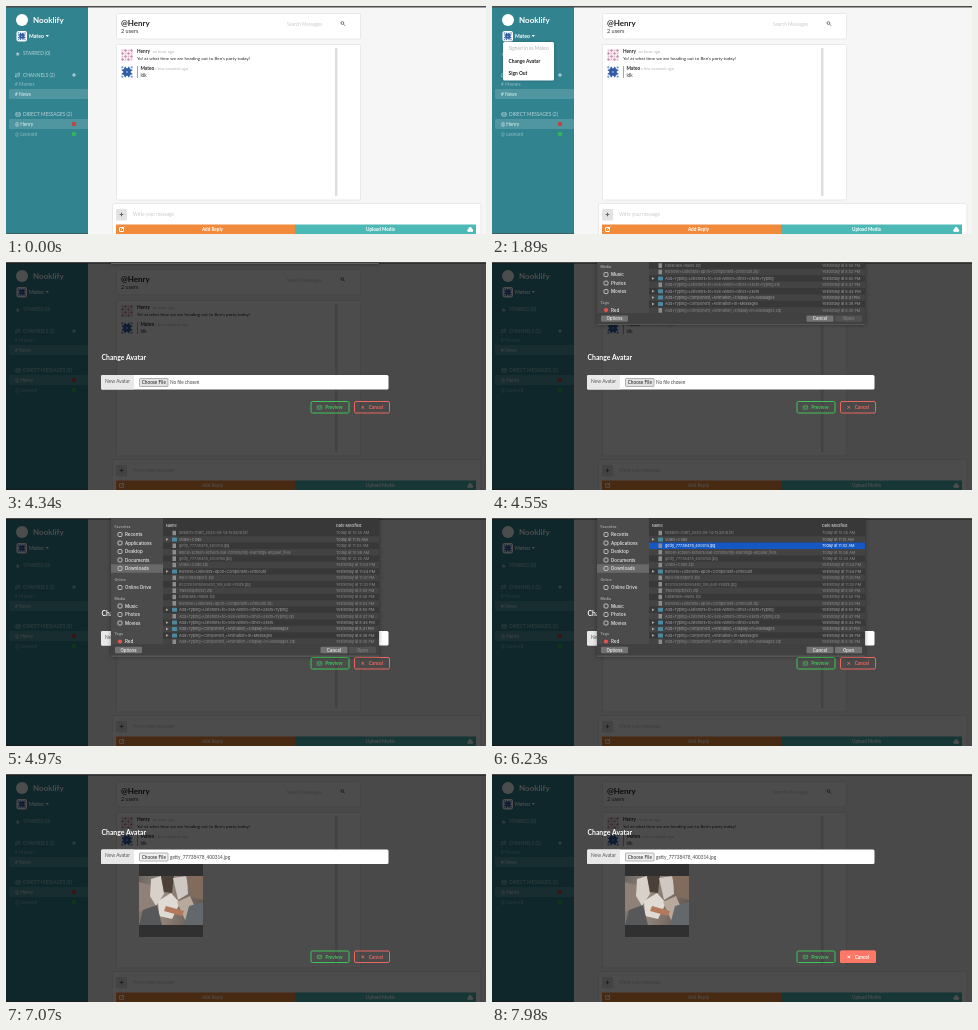
An HTML page with a canvas for the animation above (8000 ms loop, 480x228 px).

```html
<!DOCTYPE html>
<html lang="en">
<head>
<meta charset="utf-8">
<title>Change avatar</title>
<style>
html, body { margin: 0; width: 100%; height: 100%; overflow: hidden; background: #f6f6f6; }
canvas { display: block; width: 480px; height: 228px; }
</style>
</head>
<body>
<canvas id="stage" width="480" height="228"></canvas>
<script>
const ctx = document.getElementById('stage').getContext('2d');
const LOOP = 8000, TICK = 70;
const UI = 'Lato, sans-serif', SYSTEM = 'Inter, sans-serif';
const APP = 'Nooklify', FRIEND = 'Henry', ME = 'Mateo', OTHER = 'Leonard';
const FILE = 'getty_77738478_400314.jpg';

const clamp = v => Math.max(0, Math.min(1, v));
const ease = v => (1 - Math.cos(Math.PI * clamp(v))) / 2;

function box(x, y, w, h, fill, radius = 0, stroke) {
  ctx.beginPath();
  ctx.roundRect(x, y, w, h, radius);
  if (fill) { ctx.fillStyle = fill; ctx.fill(); }
  if (stroke) { ctx.strokeStyle = stroke; ctx.stroke(); }
}

function dot(x, y, r, fill) {
  ctx.beginPath();
  ctx.arc(x, y, r, 0, 7);
  ctx.fillStyle = fill;
  ctx.fill();
}

function shape(points, fill) {
  ctx.beginPath();
  points.forEach(([x, y]) => ctx.lineTo(x, y));
  ctx.fillStyle = fill;
  ctx.fill();
}

function line(points, color, width = 0.8) {
  ctx.beginPath();
  points.forEach(([x, y], i) => i ? ctx.lineTo(x, y) : ctx.moveTo(x, y));
  ctx.strokeStyle = color;
  ctx.lineWidth = width;
  ctx.stroke();
  ctx.lineWidth = 1;
}

// y is the middle of the capitals
function text(str, x, y, size, color, weight = 400, align = 'left', family = UI) {
  ctx.font = `${weight} ${size}px ${family}`;
  ctx.textAlign = align;
  ctx.fillStyle = color;
  ctx.fillText(str, x, y + size * 0.36);
}

function plus(x, y, r, color) {
  line([[x - r, y], [x + r, y]], color, 1);
  line([[x, y - r], [x, y + r]], color, 1);
}

function envelope(x, y, color) {
  ctx.lineWidth = 0.7;
  box(x - 2.2, y - 1.7, 4.4, 3.4, null, 0.5, color);
  line([[x - 2.2, y - 1.2], [x, y + 0.5], [x + 2.2, y - 1.2]], color, 0.6);
}

function blueIdenticon(x, y, s) {
  box(x, y, s, s, '#fff');
  ctx.save();
  ctx.translate(x + s / 2, y + s / 2);
  ctx.scale(s / 12, s / 12);
  box(-3.3, -3.3, 6.6, 6.6, '#315ea8');
  for (let i = 0; i < 4; i++) {
    shape([[-3, -3], [-2, -5.8], [0, -3.2], [2, -5.8], [3, -3]], '#315ea8');
    shape([[-5.6, -5.6], [-3.7, -5.6], [-3.7, -3.7], [-5.6, -3.7]], '#6f91c8');
    ctx.rotate(Math.PI / 2);
  }
  dot(0, 0, 0.8, '#c5d4ee');
  ctx.restore();
}

function pinkIdenticon(x, y) {
  box(x, y, 12, 12, '#faeef3');
  for (let i = 0; i < 16; i++) {
    const cx = x + 1.5 + 3 * (i % 4), cy = y + 1.5 + 3 * (i >> 2);
    const r = (i + (i >> 2)) % 2 ? 1.5 : 1;
    shape([[cx - r, cy], [cx, cy - r], [cx + r, cy], [cx, cy + r]], r > 1 ? '#c98fae' : '#dfb5c9');
  }
}

function sidebar() {
  const head = 'rgba(255,255,255,.66)', item = 'rgba(255,255,255,.45)';
  box(0, 0, 82, 228, '#31838f');
  dot(16, 14, 6, '#fff');
  text(APP, 27, 14.3, 8, '#fff', 700);
  box(10.5, 25, 10.5, 10.5, '#fff', 2);
  blueIdenticon(11.5, 26, 8.5);
  text(ME, 23, 30, 5.1, '#fff', 700);
  shape([[39.5, 29], [43, 29], [41.2, 31]], '#fff');

  text('★', 9, 47.5, 6, head, 400, 'left', 'DejaVu Sans, sans-serif');
  text('STARRED (0)', 17, 47.5, 4.8, head);
  line([[9, 68], [14, 68], [12.5, 66.7]], head, 0.7);
  line([[14, 70], [9, 70], [10.5, 71.3]], head, 0.7);
  text('CHANNELS (2)', 17, 69, 4.8, head);
  plus(68, 69, 2, head);
  text('# Memes', 9, 78, 4.8, item);
  box(3, 83, 79, 10, 'rgba(255,255,255,.15)', 1);
  text('# News', 9, 88, 4.8, '#e8f2f3');

  envelope(12, 108.5, head);
  text('DIRECT MESSAGES (2)', 17, 108.5, 4.8, head);
  box(3, 113, 79, 10, 'rgba(255,255,255,.15)', 1);
  text('@ ' + FRIEND, 9, 118, 4.8, '#e4f0f1');
  dot(68, 118, 2.3, '#c24444');
  text('@ ' + OTHER, 9, 128, 4.8, item);
  dot(68, 128, 2.3, '#31b558');
}

function chat() {
  const edge = '#e9e9e9', ink = '#2b2b2b', pale = '#b5b5b5';
  box(110.5, 7.5, 244, 25.5, '#fff', 1, edge);
  text('@' + FRIEND, 115, 16.8, 8, '#222', 700);
  text('2 users', 115, 25, 5.5, '#333');
  text('Search Messages', 281, 18, 4.7, '#cacaca');
  ctx.beginPath();
  ctx.arc(336.4, 17, 1.4, 0, 7);
  ctx.strokeStyle = '#777';
  ctx.stroke();
  line([[337.5, 18.2], [339, 19.8]], '#777', 1);

  box(110.5, 38.5, 244, 155.5, '#fff', 1, edge);
  box(329, 42, 2.5, 148, '#dedede');
  pinkIdenticon(115, 43);
  text(FRIEND, 131, 45.2, 4.7, ink, 700);
  text('an hour ago', 146.5, 45.2, 4.2, pale);
  text("Yo! at what time we are heading out to Ben's party today!", 131, 52, 4.5, ink);
  blueIdenticon(115, 60, 12);
  box(131, 60, 1, 12, '#c9a544');
  text(ME, 134.5, 62.5, 4.7, ink, 700);
  text('a few seconds ago', 148.5, 62.5, 4.2, pale);
  text('idk', 134.5, 69.2, 4.7, ink);

  box(106.5, 197.5, 368.5, 34, '#fff', 2, edge);
  box(110, 203, 11, 11.5, '#e3e3e3', 1);
  plus(115.5, 208.5, 1.8, '#666');
  text('Write your message', 127, 208.7, 4.7, '#c9c9c9');
  box(110, 218.5, 179, 10, '#f28a3c');
  box(289, 218.5, 181, 10, '#4db9b6');
  text('Add Reply', 206.5, 223.7, 4.65, '#fff', 700, 'center');
  text('Upload Media', 374.5, 223.7, 4.65, '#fff', 700, 'center');
  box(113.5, 221.5, 4, 4, null, 0.5, '#fff');
  line([[115, 224], [118.5, 220.5]], '#fff');
  dot(463, 224.4, 1.7, '#fff');
  dot(465.5, 224.4, 1.7, '#fff');
  dot(464.2, 222.9, 1.8, '#fff');
}

function page() {
  box(0, 0, 480, 228, '#f6f6f6');
  sidebar();
  chat();
  box(0, 0, 480, 1.5, '#4b4b4b');
  box(0, 227, 82, 1, '#3d5f66');
}

function menu() {
  ctx.save();
  ctx.shadowColor = 'rgba(0,0,0,.25)';
  ctx.shadowBlur = 3;
  box(11, 36, 51, 38.5, '#fff', 1.5);
  ctx.restore();
  text('Signed in as ' + ME, 16.5, 42, 4.85, '#b4b4b4');
  text('Change Avatar', 16.5, 55, 4.9, '#222', 700);
  text('Sign Out', 16.5, 67.5, 4.9, '#222', 700);
}

function photo(x, y) {
  box(x, y, 64, 74, '#303030');
  ctx.save();
  ctx.beginPath();
  ctx.rect(x, y + 13, 64, 49);
  ctx.clip();
  ctx.translate(x, y + 13);
  const tone = ctx.createLinearGradient(0, 0, 64, 20);
  tone.addColorStop(0, '#6b6560');
  tone.addColorStop(0.45, '#98897d');
  tone.addColorStop(1, '#655b55');
  box(0, 0, 64, 49, tone);
  shape([[0, 6], [11, 9], [15, 30], [0, 36]], '#8f8178');
  shape([[12, 3], [22, 0], [25, 18], [17, 30], [11, 20]], '#d8d1ca');
  shape([[22, 0], [35, 0], [33, 17], [25, 16]], '#4d4039');
  shape([[34, 2], [48, 0], [49, 18], [39, 24]], '#cfc7c1');
  shape([[47, 0], [64, 0], [64, 24], [52, 21]], '#806b5d');
  shape([[19, 25], [32, 17], [41, 27], [33, 43], [20, 40]], '#e0dad4');
  shape([[38, 26], [51, 20], [58, 36], [47, 46]], '#b9a99d');
  shape([[4, 34], [18, 29], [23, 49], [0, 49]], '#57585a');
  shape([[27, 30], [45, 35], [43, 40], [25, 35]], '#b3795c');
  shape([[50, 30], [64, 26], [64, 49], [45, 49]], '#62686c');
  ctx.restore();
}

function outlineButton(x, y, w, label, color, fill) {
  box(x + 0.5, y + 0.5, w - 1, 11.5, null, 1.5, color);
  if (fill) {
    ctx.save();
    ctx.globalAlpha *= fill;
    box(x, y, w, 12.5, '#ff7766', 1.5);
    ctx.restore();
  }
  text(label, x + w - 7, y + 6.4, 4.8, fill > 0.5 ? '#fff' : color, 700, 'right');
}

function modal(t) {
  const hasPhoto = t >= 7000, hasFile = t >= 6790;
  const top = hasPhoto ? -37.5 : 0;
  const actions = 139 + (hasPhoto ? 37.5 : 0);
  const pressed = t >= 3780 && t < 3920;
  const hovered = t >= 3360 && t < 7000;
  const green = '#3fc457', red = '#e8675f';
  const hover = clamp((t - 7630) / 280);

  text('Change Avatar', 95.5, 96 + top, 6.85, '#fff', 700);
  if (hasPhoto) photo(133, 89);
  box(95, 113 + top, 287.5, 14.5, '#fff', 1.5);
  box(95, 113 + top, 33, 14.5, '#e8e8e8', [1.5, 0, 0, 1.5]);
  text('New Avatar', 99, 119 + top, 4.85, '#555');
  ctx.lineWidth = 0.7;
  box(133.5, 116.5 + top, 28.5, 8, pressed ? '#f5f5f5' : hovered ? '#e3e3e3' : '#efefef', 0.8, '#959595');
  ctx.lineWidth = 1;
  text('Choose File', 147.8, 120.5 + top, 4.7, '#222', 400, 'center');
  text(hasFile ? FILE : 'No file chosen', 164, 120.5 + top, 4.7, '#444');

  outlineButton(304.5, actions, 39, 'Preview', green, 0);
  envelope(313.5, actions + 6.5, green);
  outlineButton(348, actions, 36, 'Cancel', red, hover);
  const cross = hover > 0.5 ? '#fff' : red, cy = actions + 6.4;
  line([[355.5, cy - 1.3], [358, cy + 1.3]], cross, 1);
  line([[358, cy - 1.3], [355.5, cy + 1.3]], cross, 1);
}

const places = [
  ['Favorites', 9], ['Recents', 16.5, 1], ['Applications', 25, 1], ['Desktop', 33.5, 1],
  ['Documents', 42, 1], ['Downloads', 50.5, 1], ['Online', 62], ['Online Drive', 69.5, 1],
  ['Media', 80.5], ['Music', 88, 1], ['Photos', 96.5, 1], ['Movies', 105, 1],
  ['Tags', 116], ['Red', 123.5, 1]
];

const files = [
  'session-chart_2020-09-14-153208.txt', 'Video+Code', FILE,
  'whole-screen-servers-bar-community-learnings-angular_files', 'getty_77738478_4003150.jpg',
  'Video+Code.zip', 'Remove+Listeners+upon+Component+Unmount', 'w60-hd(export).zip',
  '8321203918290482_108_640-resize.jpg', 'TweenSplit(v2).zip', 'Database+Rules.zip',
  'Remove+Listeners+upon+Component+Unmount.zip', 'Add+Typing+Listeners+to+See+When+Other+Users+Typing',
  'Add+Typing+Listeners+to+See+When+Other+Users+Typing.zip', 'Add+Typing+Listeners+to+See+When+Other+Users',
  'Add+Typing+Component,+Animation,+Display+in+Messages', 'Add+Typing+Component,+Animation+in+Messages',
  'Add+Typing+Component,+Animation,+Display+in+Messages.zip'
];
const folders = [1, 6, 12, 14, 15, 16];
const times = ['10:25 AM', '11:15 AM', '11:02 AM', '10:58 AM', '12:20 AM', '11:54 PM', '11:54 PM', '11:41 PM', '11:32 PM'];

function fileRows(t) {
  text('Name', 160, 7.3, 3.8, '#d0d0d0', 500, 'left', SYSTEM);
  text('Date Modified', 330, 7.3, 3.8, '#d0d0d0', 500, 'left', SYSTEM);
  files.forEach((name, i) => {
    const y = 15 + i * 6.4, folder = folders.includes(i);
    const chosen = i === 2 && t >= 5110;
    if (chosen || i % 2) box(157, y - 3.2, 216, 6.4, chosen ? '#1558c4' : '#434343');
    const ink = chosen ? '#fff' : folder ? '#a0a0a0' : '#8a8a8a';
    if (folder) {
      shape([[160, y - 1.4], [162.5, y], [160, y + 1.4]], '#aaa');
      box(166, y - 2, 5, 4, '#4d87a0', 0.5);
    } else {
      box(166.5, y - 2.3, 3.5, 4.6, '#8d8d8d');
    }
    text(name, 173, y, 3.8, ink, 400, 'left', SYSTEM);
    const when = i < 5 ? 'Today at ' + times[i] : 'Yesterday at ' + (times[i] || `8:${59 - 3 * (i - 9)} PM`);
    text(when, 330, y, 3.8, ink, 400, 'left', SYSTEM);
  });
}

function placesList() {
  box(105, 46.3, 52, 8.4, '#69696a');
  places.forEach(([name, y, entry]) => {
    if (!entry) return text(name, 108.5, y, 3.6, '#a5a5a5', 600, 'left', SYSTEM);
    if (name === 'Red') dot(114, y, 2.1, '#e4544f');
    else box(112, y - 2, 4, 4, null, 1, '#bdbdbd');
    text(name, 119, y, 4.5, '#ececec', 500, 'left', SYSTEM);
  });
}

function pushButton(x, label, on) {
  box(x, 128.8, 27, 6.4, on ? '#737373' : '#515151', 1);
  text(label, x + 13.5, 132, 4.3, on ? '#f3f3f3' : '#858585', 500, 'center', SYSTEM);
}

function fileSheet(t) {
  const bottom = 138.5 * (t < 6000 ? ease((t - 4300) / 530) : 1 - ease((t - 6450) / 360));
  if (bottom < 0.5) return;
  const leaving = t >= 6440;
  ctx.save();
  ctx.translate(0, bottom - 138.5);
  ctx.save();
  ctx.shadowColor = 'rgba(0,0,0,.4)';
  ctx.shadowBlur = 4;
  box(105, -4, 268, 142.5, '#464646');
  ctx.restore();
  if (!leaving) {
    box(105, 0, 52, 126.5, '#4b4b4c');
    box(157, 0, 216, 126.5, '#383838');
    ctx.save();
    ctx.beginPath();
    ctx.rect(105, 0, 268, 126.5);
    ctx.clip();
    placesList();
    fileRows(t);
    ctx.restore();
  }
  box(105, 126.3, 268, 12.2, '#414141');
  pushButton(109, 'Options', true);
  pushButton(314.5, 'Cancel', true);
  pushButton(343, 'Open', t >= 6090);
  box(105, 137.8, 268, 0.7, '#6c6c6c');
  ctx.restore();
}

function draw() {
  const t = Math.floor((performance.now() % LOOP) / TICK) * TICK;
  page();
  if (t >= 560 && t < 2730) menu();
  if (t >= 2730) {
    ctx.save();
    ctx.globalAlpha = t < 2800 ? 0.5 : 1;
    box(0, 1, 480, 227, 'rgba(0,0,0,.7)');
    modal(t);
    ctx.restore();
  }
  if (t >= 4340 && t < 6790) fileSheet(t);
  requestAnimationFrame(draw);
}
draw();
</script>
</body>
</html>
```
